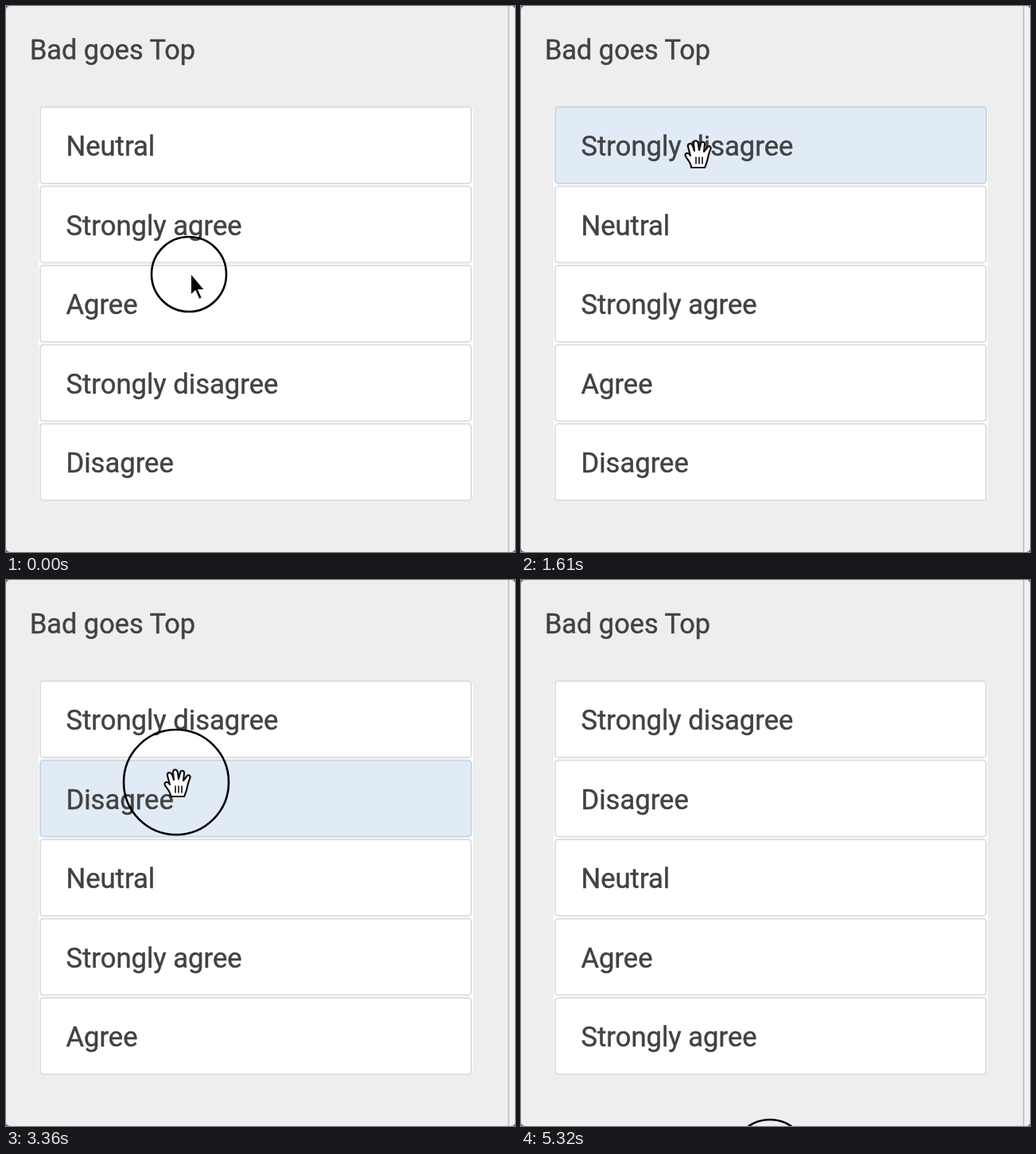
An HTML page that plays this animation: 640 px wide and 686 px high, repeating every 5460 ms.

```html
<!DOCTYPE html>
<html lang="en">
<head>
<meta charset="utf-8">
<title>Bad goes Top</title>
<style>
:root {
  --loop: 5460ms -8ms step-end infinite;
  --ink: #424242;
  --line: #dfdfdf;
  --hot: #e1ebf6;
  --hotline: #cbd8e4;
  --edge: #7791ab;
  --glow: 4px 5px 7px #dcefff;
  --ghost: #7ba5d3;
  --ghostline: #6585a8;
}
html, body { margin: 0; width: 100%; height: 100%; overflow: hidden; background: #666; }
#stage {
  position: relative; width: 640px; height: 686px; overflow: hidden;
  border-radius: 5px; background: #eee; color: var(--ink);
  font: 34.6px Roboto, "Open Sans", sans-serif; white-space: nowrap;
  -webkit-text-stroke: .45px;
}
#stage > *, .card { position: absolute; box-sizing: border-box; }
h1 { left: 30px; top: 35px; margin: 0; font: inherit; font-size: 34.3px; line-height: 40px; }
.rule { left: 631px; top: 0; width: 9px; height: 686px; border-left: 2px solid #c6c6c6; background: #f1f1f1; }
.well { left: 41px; top: 130px; width: 546px; height: 488px; background: #fff; }
.list { inset: 0; isolation: isolate; }

.card {
  left: 41.5px; top: 125.5px; width: 544px; height: 98.5px; padding-left: 32px;
  border: 2px solid var(--line); border-radius: 5px; background: #fff; line-height: 97px;
}
#sd { animation: sd-move var(--loop), sd-tint var(--loop); }
#d { animation: d-move var(--loop), d-tint var(--loop); }
#n { animation: n-move var(--loop), n-tint var(--loop); }
#sa { animation: sa-move var(--loop), sa-tint var(--loop); }
#a { animation: a-move var(--loop), a-tint var(--loop); }

/* Slots are 99.5px apart; 70ms per step */
@keyframes sd-move {
  0% { translate: 0 298.5px; }
  17.94% { translate: 0 298.5px; animation-timing-function: steps(3); }
  21.79% { translate: 0 114px; }
  23.07% { translate: 0 99.5px; animation-timing-function: steps(2); }
  25.64%, 100% { translate: 0 0; }
}
@keyframes d-move {
  0% { translate: 0 398px; }
  48.71% { translate: 0 350px; }
  50% { translate: 0 298.5px; }
  52.56% { translate: 0 253px; }
  53.84% { translate: 0 199px; }
  55.12% { translate: 0 199px; animation-timing-function: steps(2); }
  57.69%, 100% { translate: 0 99.5px; }
}
@keyframes n-move {
  0% { translate: 0 0; }
  23.07% { translate: 0 0; animation-timing-function: steps(2); }
  25.64% { translate: 0 99.5px; }
  55.12% { translate: 0 99.5px; animation-timing-function: steps(2); }
  57.69%, 100% { translate: 0 199px; }
}
@keyframes sa-move {
  0% { translate: 0 99.5px; }
  19.23% { translate: 0 99.5px; animation-timing-function: steps(2); }
  21.79% { translate: 0 184.5px; }
  23.07% { translate: 0 199px; }
  52.56% { translate: 0 256px; }
  53.84% { translate: 0 298.5px; }
  76.92% { translate: 0 298.5px; animation-timing-function: steps(2); }
  79.48%, 100% { translate: 0 398px; }
}
@keyframes a-move {
  0% { translate: 0 199px; }
  17.94% { translate: 0 199px; animation-timing-function: steps(2); }
  20.51% { translate: 0 298.5px; }
  48.71% { translate: 0 298.5px; animation-timing-function: steps(2); }
  51.28% { translate: 0 398px; }
  76.92% { translate: 0 398px; animation-timing-function: steps(2); }
  79.48%, 100% { translate: 0 298.5px; }
}

@keyframes sd-tint {
  0%, 34.61%, 100% { background: #fff; border-color: var(--line); box-shadow: none; color: var(--ink); z-index: 0; }
  6.41%, 25.64% { background: var(--hot); border-color: var(--hotline); box-shadow: none; color: var(--ink); z-index: 0; }
  11.53% { background: var(--hot); border-color: var(--edge); box-shadow: var(--glow); color: var(--ink); z-index: 0; }
  16.66% { background: var(--ghost); border-color: var(--ghostline); box-shadow: var(--glow); color: transparent; z-index: -1; }
}
@keyframes d-tint {
  0%, 64.1%, 100% { background: #fff; border-color: var(--line); box-shadow: none; color: var(--ink); z-index: 0; }
  39.74%, 61.53% { background: var(--hot); border-color: var(--hotline); box-shadow: none; color: var(--ink); z-index: 0; }
  43.58% { background: var(--hot); border-color: var(--edge); box-shadow: var(--glow); color: var(--ink); z-index: 0; }
  46.15% { background: var(--ghost); border-color: var(--ghostline); box-shadow: none; color: transparent; z-index: -1; }
}
@keyframes sa-tint {
  0%, 38.46%, 85.89%, 100% { background: #fff; border-color: var(--line); box-shadow: none; color: var(--ink); z-index: 0; }
  37.17%, 67.94%, 84.61% { background: var(--hot); border-color: var(--hotline); box-shadow: none; color: var(--ink); z-index: 0; }
  73.07% { background: var(--hot); border-color: var(--edge); box-shadow: var(--glow); color: var(--ink); z-index: 0; }
  74.35% { background: var(--ghost); border-color: var(--ghostline); box-shadow: none; color: transparent; z-index: -1; }
}
@keyframes n-tint {
  0%, 37.17%, 67.94%, 100% { background: #fff; border-color: var(--line); }
  34.61%, 64.1% { background: var(--hot); border-color: var(--hotline); }
}
@keyframes a-tint {
  0%, 6.41%, 25.64%, 39.74%, 61.53%, 84.61%, 100% { background: #fff; border-color: var(--line); }
  1.28%, 17.94%, 38.46%, 48.71%, 76.92% { background: var(--hot); border-color: var(--hotline); }
}

#pointer { left: 0; top: 0; width: 0; height: 0; animation: roam var(--loop); }
#pointer svg { position: absolute; left: 0; top: 0; width: 1px; height: 1px; overflow: visible; }
@keyframes roam {
  0% { translate: 230px 337px; animation-timing-function: steps(8); }
  10.25% { translate: 224px 489px; }
  16.66% { translate: 223px 483px; animation-timing-function: steps(4); }
  21.79% { translate: 219.5px 237px; animation-timing-function: steps(3); }
  25.64% { translate: 221px 185px; }
  33.33% { translate: 221px 185px; animation-timing-function: steps(5); }
  39.74% { translate: 209px 530px; animation-timing-function: steps(2); }
  42.3% { translate: 203px 545px; }
  46.15% { translate: 203px 545px; animation-timing-function: steps(5); }
  52.56% { translate: 214px 329px; animation-timing-function: steps(5); }
  58.97% { translate: 214px 254px; }
  61.53% { translate: 214px 254px; animation-timing-function: steps(6); }
  69.23% { translate: 228px 464px; }
  74.35% { translate: 228px 464px; animation-timing-function: steps(6); }
  82.05% { translate: 228px 566px; }
  84.61% { translate: 228px 566px; animation-timing-function: steps(4); }
  89.74% { translate: 262px 770px; }
  96.15% { translate: 294px 627px; }
  97.43%, 100% { translate: 313px 725px; }
}

.drag {
  left: var(--x); top: var(--y); opacity: .95; visibility: hidden;
  background: #dce8f5; border-color: #828e9b; color: #54595f;
  box-shadow: 2px 4px 7px rgba(140, 185, 225, .55), 0 1px 3px rgba(0, 0, 0, .2),
    0 6px 24px 14px rgba(0, 0, 0, .055);
}
#drag-sd { --x: -181.5px; --y: -60px; animation: hold-sd var(--loop); }
#drag-d { --x: -161px; --y: -21.5px; animation: hold-d var(--loop); }
#drag-sa { --x: -186px; --y: -40.5px; animation: hold-sa var(--loop); }
@keyframes hold-sd { 0%, 25.64%, 100% { visibility: hidden; } 16.66% { visibility: visible; } }
@keyframes hold-d { 0%, 61.53%, 100% { visibility: hidden; } 46.15% { visibility: visible; } }
@keyframes hold-sa { 0%, 84.61%, 100% { visibility: hidden; } 74.35% { visibility: visible; } }

#ring { fill: none; stroke: #000; stroke-width: 2.6; animation: ring var(--loop); }
@keyframes ring {
  0%, 12.82%, 26.92%, 44.87%, 62.82%, 85.89%, 96.15%, 100% { r: 47px; }
  1.28%, 11.53%, 43.58% { r: 28px; }
  2.56%, 28.2%, 64.1%, 87.17% { r: 0; }
  14.1% { r: 60px; }
  15.38%, 25.64%, 46.15%, 61.53%, 73.07%, 84.61% { r: 66px; }
}

.hand { fill: #fff; stroke: #111; stroke-width: 2.2; stroke-linejoin: round; stroke-linecap: round; }
#open { animation: open var(--loop); }
#fist { animation: fist var(--loop); }
#arrow { fill: #000; stroke: #fff; stroke-width: 2; animation: arrow var(--loop); }
@keyframes open {
  0%, 11.53%, 43.58%, 73.07%, 96.15%, 100% { visibility: hidden; }
  1.28%, 16.66%, 46.15%, 74.35% { visibility: visible; }
}
@keyframes fist {
  0%, 16.66%, 46.15%, 74.35%, 100% { visibility: hidden; }
  11.53%, 43.58%, 73.07% { visibility: visible; }
}
@keyframes arrow {
  0%, 96.15%, 100% { visibility: visible; }
  1.28% { visibility: hidden; }
}
</style>
</head>
<body>
<div id="stage">
  <div class="rule"></div>
  <h1>Bad goes Top</h1>
  <div class="well"></div>
  <div class="list">
    <div class="card" id="sd">Strongly disagree</div>
    <div class="card" id="d">Disagree</div>
    <div class="card" id="n">Neutral</div>
    <div class="card" id="a">Agree</div>
    <div class="card" id="sa">Strongly agree</div>
  </div>
  <div id="pointer">
    <div class="card drag" id="drag-sd">Strongly disagree</div>
    <div class="card drag" id="drag-d">Disagree</div>
    <div class="card drag" id="drag-sa">Strongly agree</div>
    <svg>
      <circle id="ring" r="47"/>
      <path id="arrow" d="M2-2V27L8 21.5L12.5 32L17 30L12.5 20H20.5Z"/>
      <g id="open" class="hand">
        <path d="M-7 18C-7 12-11 9-14 4C-16 0-11-2-8 3L-11-8C-12-12-7-14-5-9L-3-3L-4-12C-4-17 1-17 2-12L3-4L5-12C6-16 11-14 10-11L9-2L13-7C15-11 19-8 17-4C14 2 14 10 10 18Z"/>
        <path stroke-width="1.6" d="M-1 5v8M3 5v8M7 5v8"/>
      </g>
      <g id="fist" class="hand">
        <path d="M-7 17C-7 12-13 8-13 3C-13 0-10-1-8 1L-9-4C-9-9-4-9-3-6C-2-11 4-11 4-6C6-10 11-8 10-4C13-6 16-3 15 1C14 8 11 11 10 17Z"/>
        <path stroke-width="1.6" d="M-2 2v8M2 2v8M6 2v8"/>
      </g>
    </svg>
  </div>
</div>
</body>
</html>
```
